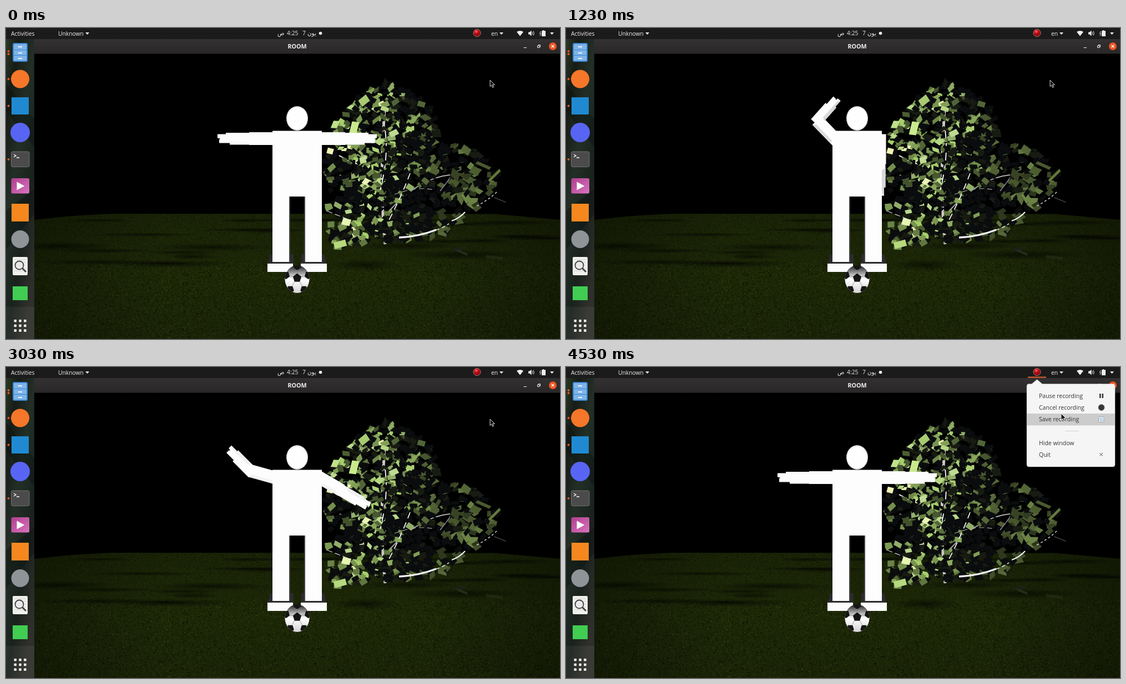
An HTML page with a canvas for the animation above (4.56 s loop, 998 px wide and 561 px high).

```html
<!DOCTYPE html>
<html lang="en">
<head>
<meta charset="utf-8">
<title>Room</title>
<style>
html, body { margin: 0; width: 998px; height: 561px; overflow: hidden; background: #000; }
canvas, svg { position: absolute; left: 0; top: 0; }
text { font-family: "Open Sans", "Noto Sans", "DejaVu Sans", sans-serif; font-size: 10.3px; fill: #f0f0f0; }
#menu text { font-size: 10.5px; fill: #333; }
.title { font-size: 10.7px; font-weight: 700; }
</style>
</head>
<body>
<canvas id="scene" width="998" height="561"></canvas>
<svg width="998" height="561" viewBox="0 0 998 561">
  <defs>
    <linearGradient id="bar" x2="0" y2="1">
      <stop stop-color="#343132"/><stop offset="1" stop-color="#292728"/>
    </linearGradient>
    <linearGradient id="wall" x2=".6" y2="1">
      <stop stop-color="#2a3a26"/><stop offset=".2" stop-color="#161c16"/>
      <stop offset=".45" stop-color="#222f26"/><stop offset=".75" stop-color="#1a221e"/>
      <stop offset="1" stop-color="#2f2f2b"/>
    </linearGradient>
    <radialGradient id="skin">
      <stop offset=".88" stop-color="#fefefe"/><stop offset="1" stop-color="#cfcfcf"/>
    </radialGradient>
    <linearGradient id="shine" x2="0" y2="1">
      <stop stop-color="#1c1c1c"/><stop offset=".3" stop-color="#a8a8a8"/>
      <stop offset=".5" stop-color="#fff"/><stop offset="1" stop-color="#d4d4d4"/>
    </linearGradient>
    <radialGradient id="rec" cx=".4" cy=".3">
      <stop stop-color="#ff8a8a"/><stop offset=".4" stop-color="#d3161c"/><stop offset="1" stop-color="#8d0a10"/>
    </radialGradient>
    <linearGradient id="pink" x2="1" y2="1">
      <stop stop-color="#b03f8e"/><stop offset="1" stop-color="#d774bd"/>
    </linearGradient>
    <clipPath id="round"><ellipse cx="524.5" cy="453" rx="22" ry="25"/></clipPath>
    <g id="forearm">
      <path d="M6-10.5H-43V-8H-58V-1L-53 0L-55 2V8H-36V11H6Z" fill="#fdfdfd"/>
      <path class="shade" d="M-8-10.5H-43V-8H-57L-54-4H-42L-12-4Z" fill="#d8d8d8"/>
    </g>
    <g id="upper">
      <path d="M8-11.5H-46V11.5H8Z" fill="#fdfdfd"/>
      <path class="shade" d="M0 11.5H-46L-42 6H0Z" fill="#dcdcdc"/>
    </g>
  </defs>

  <!-- figure -->
  <g id="right"><use href="#upper"/><use id="rightFore" href="#forearm"/></g>
  <g transform="translate(1049) scale(-1 1)">
    <g id="left"><use href="#upper"/><use href="#forearm" x="-45"/></g>
  </g>
  <path d="M476 408H518V426H472ZM532 408H573L577 426H531Z" fill="#2b2a2e"/>
  <path d="M510 304H512V422H510ZM537 304H539V422H537Z" fill="#464646"/>
  <path d="M480 185.5H569V422H539V304H510V422H480ZM471 425H517V440H471ZM531 425H578V440H531Z" fill="#fdfdfd"/>
  <ellipse cx="524.5" cy="163" rx="19.5" ry="22" fill="url(#skin)"/>
  <ellipse cx="524.5" cy="453" rx="22" ry="25" fill="url(#shine)"/>
  <g id="ball" clip-path="url(#round)"></g>

  <!-- dock -->
  <path d="M0 19H51V561H0Z" fill="url(#wall)"/>
  <path d="M0 100L51 165V215L0 150ZM0 330L51 290V335L0 400Z" fill="#0d1210" opacity=".45"/>
  <path d="M0 503H51V561H0Z" fill="#fff" opacity=".05"/>
  <g id="dots" fill="#e95420"></g>
  <rect x="12" y="27" width="27" height="34" rx="3" fill="#3c84cf"/>
  <rect x="14" y="29" width="23" height="30" rx="1" fill="#7db4e8"/>
  <path d="M14 39.5H37M14 49.5H37" stroke="#3c84cf"/>
  <path d="M22 34H29M22 45H29M22 55H29" stroke="#eef5fc" stroke-width="2"/>
  <circle cx="25.5" cy="92" r="16.5" fill="#f6762a"/>
  <rect x="10" y="125" width="31" height="31" fill="#1f8ad2"/>
  <circle cx="25.5" cy="188.5" r="17.5" fill="#5865f2"/>
  <rect x="9.5" y="223" width="32.5" height="27.5" rx="2.5" fill="#4c4b4c" stroke="#707070"/>
  <path d="M14 228L18 230.5L14 233M19 234H24" fill="none" stroke="#fff" stroke-width="1.3"/>
  <rect x="9.5" y="271" width="32.5" height="27.5" rx="2.5" fill="url(#pink)"/>
  <path d="M19.5 277.5L33.5 285L19.5 292.5Z" fill="#fff"/>
  <rect x="10" y="317" width="31" height="32" fill="#f5871f"/>
  <circle cx="25.5" cy="381" r="16" fill="#8f9499"/>
  <rect x="12" y="413" width="27" height="33" rx="2" fill="#f1f1ee"/>
  <path d="M15 418H36M15 423H36M15 428H36M15 433H36M15 438H36" stroke="#cfcfcb"/>
  <circle cx="24" cy="428" r="7.5" fill="#e7e9e8" fill-opacity=".8" stroke="#444" stroke-width="1.8"/>
  <path d="M29.5 433.5L36 440" stroke="#444" stroke-width="2.8"/>
  <rect x="12" y="466" width="27" height="25" fill="#41cd52"/>
  <g id="apps" fill="#f4f4f4"></g>

  <!-- bars -->
  <path d="M0 0H998V20H0Z" fill="#1b1b1b"/>
  <path d="M51 20H998V46.500H51Z" fill="url(#bar)"/>
  <text x="9" y="13.5">Activities</text>
  <text x="94" y="13.5">Unknown</text>
  <text x="489" y="13">ص</text>
  <text x="506" y="13.3">4:25</text>
  <text x="534" y="13.3">7</text>
  <text x="543" y="13">يون</text>
  <circle cx="566.5" cy="9.5" r="2.8" fill="#f4f4f4"/>
  <text x="874" y="13.5">en</text>
  <path d="M143 8H150L146.500 12ZM889 8H896L892.500 12ZM980 8H987L983.500 12Z" fill="#f0f0f0"/>
  <path d="M920 7Q926 3 932 7L926 14.500ZM941 7.500H943.500L946.500 4.500V14.500L943.500 11.500H941ZM965 5H967V4H969V5H972V15H965Z" fill="#f0f0f0"/>
  <path d="M948 7Q949.500 9.500 948 12M950 5.500Q952.500 9.500 950 13.500M963 6L961.500 10H963.500L962 14" fill="none" stroke="#ddd"/>
  <circle cx="848.5" cy="9" r="6.5" fill="url(#rec)" stroke="#e4b5b5" stroke-width=".6"/>
  <text class="title" x="524.5" y="37.3" text-anchor="middle">ROOM</text>
  <path d="M932.500 35.500H938M957.500 32H961V35.500H957.500ZM959 32V30.500H962.500V34H961" fill="none" stroke="#eee"/>
  <circle cx="985" cy="33" r="7" fill="#e95420"/>
  <path d="M982.500 30.500L987.500 35.500M987.500 30.500L982.500 35.500" stroke="#fff" stroke-width="1.2"/>

  <!-- popup -->
  <path id="line" d="M832 18.500H865" stroke="#e9662f" stroke-width="1.8"/>
  <g id="menu">
    <path d="M834 30.500H839L848.500 22.500L858 30.500H985Q989 30.500 989 34.500V176Q989 180 985 180H834Q830 180 830 176V34.500Q830 30.500 834 30.500Z" fill="#f6f5f5" stroke="#bbb" stroke-width=".5"/>
    <rect id="hover" x="830" width="159" height="21.4" fill="#cdcccd"/>
    <g id="labels"></g>
    <path d="M899 115.500H924" stroke="#d3d1cc"/>
    <path d="M961 48H963.500V56H961ZM965.500 48H968V56H965.500Z" fill="#333"/>
    <circle cx="964.5" cy="73" r="5.5" fill="#383838" stroke="#777"/>
    <rect x="959.5" y="89.5" width="9.5" height="10" rx="1" fill="#dce6ef" stroke="#9aabb8"/>
    <path d="M962 93H965M962 96H967" stroke="#7e99b2" stroke-width=".8"/>
    <path d="M961.500 155L967 160.500M967 155L961.500 160.500" stroke="#444"/>
  </g>
  <path id="cursor" d="M0 0V11.500L2.700 9L4.600 13.400L6.600 12.500L4.700 8.300H8.300Z" fill="#111" stroke="#eee" stroke-width=".9"/>
</svg>

<script>
const LOOP = 4560;
const $ = id => document.getElementById(id);

let seed = 71;
const rnd = () => {
  seed = (seed * 1664525 + 1013904223) >>> 0;
  return seed / 4294967296;
};
const range = (a, b) => a + (b - a) * rnd();

const ctx = $("scene").getContext("2d");

function drawGround() {
  ctx.save();
  ctx.beginPath();
  ctx.moveTo(51, 346);
  for (const [x, y] of [[120, 339], [190, 335], [880, 335.5], [998, 346], [998, 561], [51, 561]]) ctx.lineTo(x, y);
  ctx.clip();
  const g = ctx.createLinearGradient(0, 335, 0, 561);
  g.addColorStop(0, "#192206");
  g.addColorStop(.5, "#1d2807");
  g.addColorStop(1, "#1a2307");
  ctx.fillStyle = g;
  ctx.fillRect(51, 330, 947, 231);

  for (let i = 0; i < 30000; i++) {
    const y = range(335, 561);
    const light = rnd() < .5;
    ctx.fillStyle = light ? `rgba(68,80,24,${range(.1, .4)})` : `rgba(0,0,0,${range(.15, .45)})`;
    ctx.fillRect(range(51, 998), y, range(1, 2), y > 420 ? range(1, 2.5) : 1);
  }
  for (let i = 0; i < 26; i++) {
    const y = range(345, 430);
    ctx.save();
    ctx.translate(range(51, 998), y);
    ctx.scale(range(50, 130), range(3, 4 + (y - 340) / 12));
    const s = ctx.createRadialGradient(0, 0, 0, 0, 0, 1);
    s.addColorStop(0, "rgba(0,0,0,.55)");
    s.addColorStop(1, "rgba(0,0,0,0)");
    ctx.fillStyle = s;
    ctx.fillRect(-1, -1, 2, 2);
    ctx.restore();
  }
  const edge = ctx.createLinearGradient(51, 0, 998, 0);
  edge.addColorStop(0, "rgba(0,0,0,.3)");
  edge.addColorStop(.25, "rgba(0,0,0,0)");
  edge.addColorStop(.75, "rgba(0,0,0,0)");
  edge.addColorStop(1, "rgba(0,0,0,.3)");
  ctx.fillStyle = edge;
  ctx.fillRect(51, 330, 947, 231);
  ctx.restore();
}

function leaf(x, y, w, h, turn, fill) {
  ctx.save();
  ctx.translate(x, y);
  ctx.rotate(turn);
  ctx.transform(1, range(-.3, .3), range(-.4, .4), 1, 0, 0);
  ctx.fillStyle = fill;
  ctx.fillRect(-w / 2, -h / 2, w, h);
  ctx.restore();
}

function branch(x1, y1, cx, cy, x2, y2, width, color, dash = []) {
  ctx.beginPath();
  ctx.moveTo(x1, y1);
  ctx.quadraticCurveTo(cx, cy, x2, y2);
  ctx.lineWidth = width;
  ctx.strokeStyle = color;
  ctx.setLineDash(dash);
  ctx.stroke();
}

function leafColor(x) {
  if (x > 750) return `hsl(82,30%,${range(16, 40)}%)`;
  const r = rnd();
  if (r < .05 && x < 690) return "#eaf5b4";
  if (r < .2 && x < 730) return `hsl(84,50%,${range(60, 72)}%)`;
  return `hsl(84,30%,${range(24, 56)}%)`;
}

function drawTree() {
  const crown = new Path2D("M683 98L725 114L765 142L780 180L784 212L826 210L860 236L884 264L872 302L838 338L790 372L730 384L660 388L600 396L576 380V190L594 172L632 130L656 112Z");

  branch(683, 390, 672, 280, 682, 150, 5, "#c9c9c2");
  branch(682, 300, 640, 250, 600, 230, 2, "#ddd");
  branch(690, 330, 745, 270, 800, 265, 2, "#aaa");

  for (let n = 0; n < 1250;) {
    const x = range(572, 892), y = range(96, 400);
    if (!ctx.isPointInPath(crown, x, y)) continue;
    n++;
    const far = x > 775;
    if (far && rnd() < .55 || x < 612 && rnd() < .45) continue;
    const shadow = x > 680 && x < 790 && y > 265;
    const top = x > 725 && y < 160;
    const lit = rnd() < (top ? .12 : shadow ? .14 : far ? .58 : y > 300 ? .3 : x < 700 ? .42 : .34);
    const size = far ? range(9, 18) : range(8, 15);
    const fill = lit ? leafColor(x) : rnd() < .2 ? "#171b12" : "#0a0c0e";
    leaf(x, y, size, size * range(.45, .9), range(-.9, .9), fill);
  }

  leaf(627, 181, 13, 24, .1, "#c9ea8c");
  leaf(645, 131, 17, 13, -.4, "#a8cb72");
  leaf(593, 174, 11, 13, 0, "#c0e28a");
  leaf(584, 222, 11, 10, .1, "#f2f3b6");
  leaf(613, 350, 15, 12, .2, "#e8f4b4");
  leaf(602, 390, 22, 12, -.3, "#b5d97c");
  leaf(683, 100, 8, 14, .6, "#14170f");
  leaf(880, 266, 27, 5, -.5, "#63793b");
  leaf(860, 248, 27, 6, .5, "#4a5930");
  leaf(816, 399, 26, 7, .1, "#1c2114");
  leaf(822, 405, 20, 4, .2, "#252c18");
  leaf(880, 414, 30, 5, .3, "#20280f");
  leaf(890, 310, 22, 2, .1, "#3a3d34");

  branch(683, 185, 690, 235, 672, 300, 1.8, "#fff", [14, 9, 5, 12]);
  branch(728, 262, 712, 305, 688, 350, 1.8, "#eee", [12, 8]);
  branch(616, 345, 590, 335, 578, 330, 1.2, "#ddd", [10, 5]);
  branch(708, 378, 745, 376, 775, 364, 3.5, "#f4f4f4");
  branch(775, 364, 785, 362, 798, 353, 1.6, "#ddd", [6, 5]);
  branch(803, 348, 817, 343, 827, 332, 2.2, "#f2f2f2");
  branch(848, 321, 870, 310, 886, 294, 1.5, "#d8d8d8", [4, 4]);
  branch(782, 294, 792, 282, 800, 270, 1.2, "#a9a4c4");
  branch(700, 300, 740, 285, 772, 292, 1.2, "#aaa", [9, 6]);
}

function polygon(cx, cy, r, turn) {
  let d = "";
  for (let i = 0; i < 5; i++) {
    const a = turn + i * Math.PI * .4;
    d += (i ? "L" : "M") + (cx + r * Math.cos(a)) + " " + (cy + r * 1.05 * Math.sin(a));
  }
  return d + "Z";
}

function fillIn() {
  const up = -Math.PI / 2;
  let patches = polygon(524.5, 451, 8, up), seams = "";
  for (let i = 0; i < 5; i++) {
    const a = up + i * Math.PI * .4, c = Math.cos(a), s = Math.sin(a);
    patches += polygon(524.5 + 21 * c, 453 + 23 * s, 7, a + Math.PI);
    seams += `M${524.5 + 8 * c} ${451 + 8 * s}L${524.5 + 15 * c} ${452 + 16 * s}`;
  }
  $("ball").innerHTML = `<path d="${patches}" fill="#151515"/><path d="${seams}" stroke="#888" stroke-width=".8"/>`;

  $("dots").innerHTML = [42, 47, 92, 140.5, 237].map(y => `<circle cx="4.5" cy="${y}" r="2"/>`).join("");
  let apps = "";
  for (let i = 0; i < 9; i++) {
    apps += `<rect x="${14.5 + 8.8 * (i % 3)}" y="${526 + 8.8 * Math.floor(i / 3)}" width="4.5" height="4.5" rx="1"/>`;
  }
  $("apps").innerHTML = apps;
  const labels = ["Pause recording", "Cancel recording", "Save recording", "", "Hide window", "Quit"];
  $("labels").innerHTML = labels.map((s, i) => s && `<text x="852" y="${55.8 + 21.2 * i}">${s}</text>`).join("");
}

const clamp = v => Math.max(0, Math.min(1, v));
const ramp = (t, a, b) => clamp((t - a) / (b - a));
const ease = v => v * v * (3 - 2 * v);

const pointer = [[0, 872, 94], [3180, 872, 94], [3440, 853, -1], [3600, 853, -1],
  [3780, 847, 2], [3950, 847, 2], [4400, 892, 84], [LOOP, 892, 84]];

function pointerAt(t) {
  const i = pointer.findIndex(p => p[0] > t);
  const [t0, x0, y0] = pointer[i - 1], [t1, x1, y1] = pointer[i];
  const k = ease(ramp(t, t0, t1));
  return [x0 + (x1 - x0) * k, y0 + (y1 - y0) * k];
}

const shades = document.querySelectorAll(".shade");

function render(t) {
  const raise = ramp(t, 60, 560) - ramp(t, 2700, 3200);
  const wave = 82.5 + 7.5 * Math.cos((t - 770) / 2600 * 2 * Math.PI);
  $("right").setAttribute("transform", `translate(484 199.5) rotate(${46 * raise})`);
  $("rightFore").setAttribute("transform", `translate(-45 0) rotate(${wave * raise}) scale(${1 - .06 * raise})`);
  $("left").setAttribute("transform", `translate(484 199.5) rotate(${-90 * raise})`);
  shades.forEach(s => s.setAttribute("opacity", raise));

  const [x, y] = pointerAt(t);
  $("cursor").setAttribute("transform", `translate(${x} ${y})`);

  const open = ramp(t, 3740, 3850);
  $("menu").setAttribute("opacity", open);
  $("menu").setAttribute("transform", `translate(0 ${-8 * (1 - open)})`);
  $("line").setAttribute("opacity", open > 0 ? 1 : 0);
  const row = Math.floor((y - 41) / 21.4);
  $("hover").setAttribute("y", 41.2 + 21.4 * row);
  $("hover").setAttribute("opacity", open === 1 && row >= 0 ? 1 : 0);
}

drawGround();
drawTree();
fillIn();

const start = performance.now();
function tick() {
  render((performance.now() - start) % LOOP);
  requestAnimationFrame(tick);
}
tick();
</script>
</body>
</html>
```
